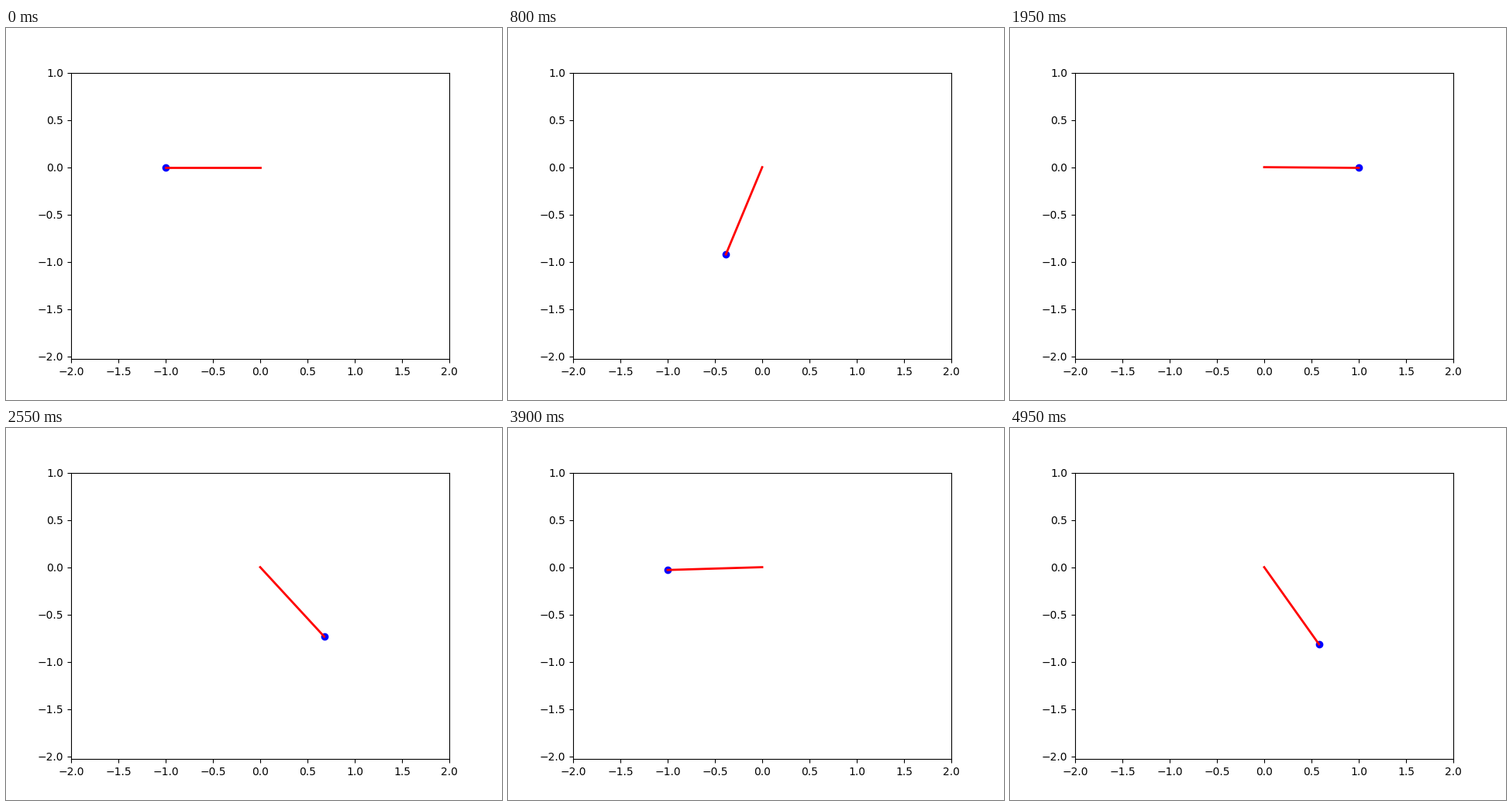
A matplotlib script that plays this animation: 640 px wide and 480 px high, repeating every 5000 ms.

```python
import numpy as np
import matplotlib.pyplot as plt
from matplotlib.animation import FuncAnimation

FRAMES = 100
INTERVAL = 50  # ms
LENGTH = 1.0
GRAVITY = 3.8576
SUBSTEPS = 10


def slope(state):
    angle, speed = state
    return np.array([speed, -GRAVITY / LENGTH * np.sin(angle)])


def rk4_step(state, dt):
    k1 = slope(state)
    k2 = slope(state + dt / 2 * k1)
    k3 = slope(state + dt / 2 * k2)
    k4 = slope(state + dt * k3)
    return state + dt / 6 * (k1 + 2 * k2 + 2 * k3 + k4)


def swing():
    """Angle from the vertical for every frame, released level at the left."""
    state = np.array([-np.pi / 2, 0.0])
    dt = INTERVAL / 1000 / SUBSTEPS
    angles = []
    for _ in range(FRAMES):
        angles.append(state[0])
        for _ in range(SUBSTEPS):
            state = rk4_step(state, dt)
    return np.array(angles)


angles = swing()
xs, ys = LENGTH * np.sin(angles), -LENGTH * np.cos(angles)

fig, ax = plt.subplots(figsize=(6.4, 4.8), dpi=100)
ax.set_aspect("equal")
ax.set_xlim(-2, 2)
ax.set_ylim(-2.03, 1)

bob, = ax.plot([], [], "o", color="blue")
rod, = ax.plot([], [], color="red", lw=2)


def update(i):
    bob.set_data([xs[i]], [ys[i]])
    rod.set_data([0, xs[i]], [0, ys[i]])
    return bob, rod


anim = FuncAnimation(fig, update, frames=FRAMES, interval=INTERVAL,
                     repeat=True, repeat_delay=0)
plt.show()
```
